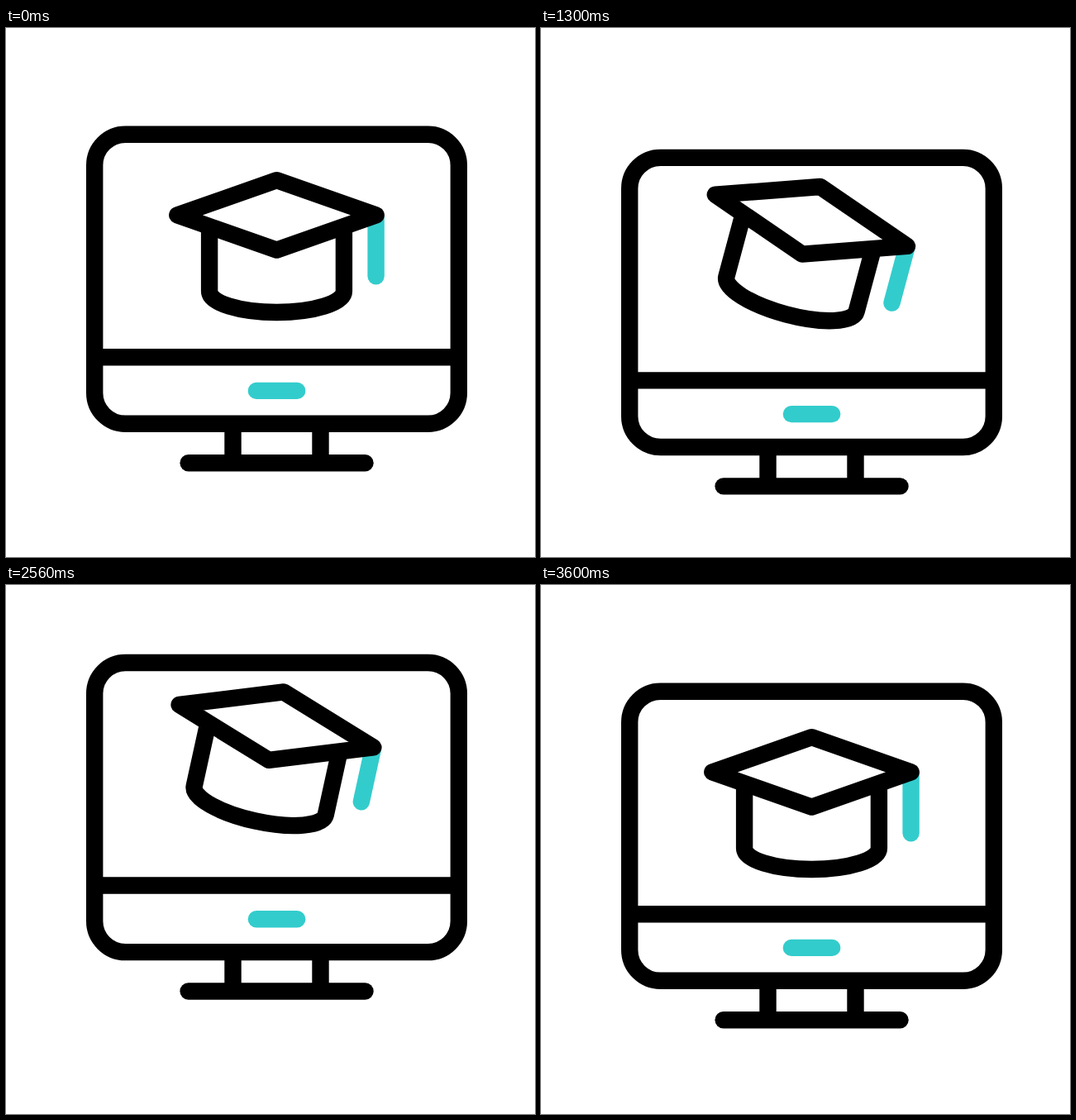
Write an HTML page that moves like this. It is 640 by 640 pixels and loops after 3620 ms.

```html
<!DOCTYPE html>
<html lang="en">
<head>
<meta charset="utf-8">
<title>Online learning</title>
<style>
  html, body { margin: 0; width: 100%; height: 100%; overflow: hidden; background: #fff; }
  svg { display: block; width: 100%; height: 100%; }
  path, rect { fill: none; stroke: #000; stroke-width: 20.4; stroke-linejoin: round; }
  .round { stroke-linecap: round; }
  .accent { stroke: #3cc; }
</style>
</head>
<body>
<svg viewBox="0 0 640 640">
  <g id="monitor">
    <rect x="107.2" y="128.7" width="440.6" height="350.1" rx="37.3"/>
    <path d="M107 398.2H548M274.5 479V526M380.5 479V526"/>
    <path class="round" d="M220.6 526.2H434.5"/>
    <path class="round accent" d="M302.9 438.9H352.2"/>
    <g id="cap">
      <path id="tassel" class="round accent"/>
      <path d="M246.1 240V318.5C246.1 332.6 282.5 344 327.5 344S408.9 332.6 408.9 318.5V240"/>
      <path d="M207.3 226.4L327.5 184.2L447.7 226.4L327.5 268.6Z"/>
    </g>
  </g>
</svg>
<script>
  const LOOP = 3620, STEP = 20;
  const [monitor, cap, tassel] = ['monitor', 'cap', 'tassel'].map(id => document.getElementById(id));

  // Values sit at equal intervals; each pair is joined by a smooth ease in and out.
  function ease(t, interval, values) {
    const i = Math.min(Math.floor(t / interval), values.length - 2);
    const s = Math.min(t / interval - i, 1);
    return values[i] + (values[i + 1] - values[i]) * s * s * (3 - 2 * s);
  }

  function draw() {
    const t = Math.floor(performance.now() % LOOP / STEP) * STEP;
    const floatY = ease(t, 1200, [0, 29.5, -36.4, 0]);
    const bounceY = ease(t, 600, [0, 25.4, -25.5, 25.4, -25.5, 0, 0]);
    const tilt = ease(t, 600, [0, 15, 15, 15, 15, 0, 0]);
    const length = ease(t, 600, [74, 38, 74, 38, 74, 38, 74]);

    monitor.setAttribute('transform', `translate(0 ${floatY})`);
    cap.setAttribute('transform', `translate(0 ${bounceY}) rotate(${tilt} 327.5 224)`);
    tassel.setAttribute('d', `M447.6 229V${226.2 + length}`);
    requestAnimationFrame(draw);
  }
  draw();
</script>
</body>
</html>
```
